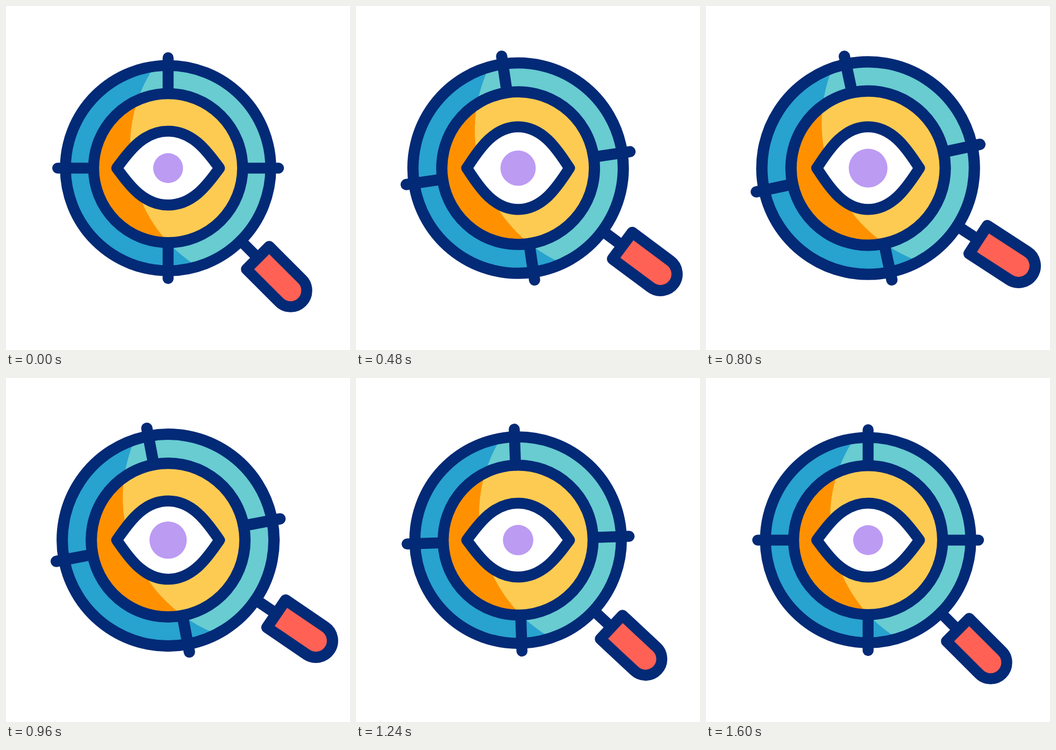
Write an HTML page that moves like this. It is 640x640 px and loops after 1.72 s.

```html
<!DOCTYPE html>
<html lang="en">
<head>
<meta charset="utf-8">
<title>Focus lens</title>
<style>
  html, body { margin: 0; height: 100%; overflow: hidden; background: #fff; }
  svg { display: block; width: 100vw; height: 100vh; }
  .line { fill: none; stroke: #032a76; stroke-width: 20.4; stroke-linecap: round; stroke-linejoin: round; }
</style>
</head>
<body>
<svg viewBox="0 0 640 640">
  <defs>
    <clipPath id="outer"><circle r="191"/></clipPath>
    <clipPath id="inner"><circle r="138.6"/></clipPath>
  </defs>
  <g transform="translate(301.6 301.6)">
    <g id="lens">
      <g clip-path="url(#outer)">
        <circle r="191" fill="#28a2cf"/>
        <circle cx="193.4" cy="-41.6" r="264" fill="#68ccd1"/>
      </g>
      <g clip-path="url(#inner)">
        <circle r="138.6" fill="#ff9100"/>
        <circle cx="193.4" cy="-41.6" r="264" fill="#fecb52"/>
      </g>
      <g class="line">
        <circle r="191"/>
        <circle r="138.6"/>
        <path d="M0-138.6V-205.4M0 138.6V205.4M-138.6 0H-205.4M138.6 0H205.4"/>
        <g transform="rotate(45)">
          <path d="M191 0H236"/>
          <path d="M236-30H322.4A30 30 0 0 1 322.4 30H236Z" fill="#ff6254"/>
        </g>
      </g>
    </g>
    <path id="eye" class="line" style="fill:#fff"/>
    <circle id="pupil" fill="#bc9bf3"/>
  </g>
</svg>
<script>
  const LOOP = 1720;
  const [lens, eye, pupil] = ["lens", "eye", "pupil"].map(id => document.getElementById(id));

  const easeInOut = (u, power) =>
    u < 0.5 ? (2 * u) ** power / 2 : 1 - (2 - 2 * u) ** power / 2;

  // Rises from 0 to 1 between start and peak, then falls back by end.
  function pulse(t, start, peak, end, power) {
    const u = t < peak ? (t - start) / (peak - start) : (end - t) / (end - peak);
    return easeInOut(Math.max(0, u), power);
  }

  function eyePath(h) {
    const low = 0.343 * h;
    return `M-95.6 0C-77.6 ${-low} -49.6 ${-h} 0 ${-h}S77.6 ${-low} 95.6 0` +
           `C77.6 ${low} 49.6 ${h} 0 ${h}S-77.6 ${low} -95.6 0Z`;
  }

  function draw() {
    const t = performance.now() % LOOP;
    const turn = pulse(t, 70, 770, 1470, 2.6);
    lens.setAttribute("transform", `rotate(${-12 * turn}) scale(${1 + 0.035 * turn})`);
    eye.setAttribute("d", eyePath(68.7 + 9.5 * pulse(t, 40, 640, 1240, 2)));
    pupil.setAttribute("r", 27.8 + 8.3 * pulse(t, 150, 758, 1375, 2.6));
    requestAnimationFrame(draw);
  }
  draw();
</script>
</body>
</html>
```
